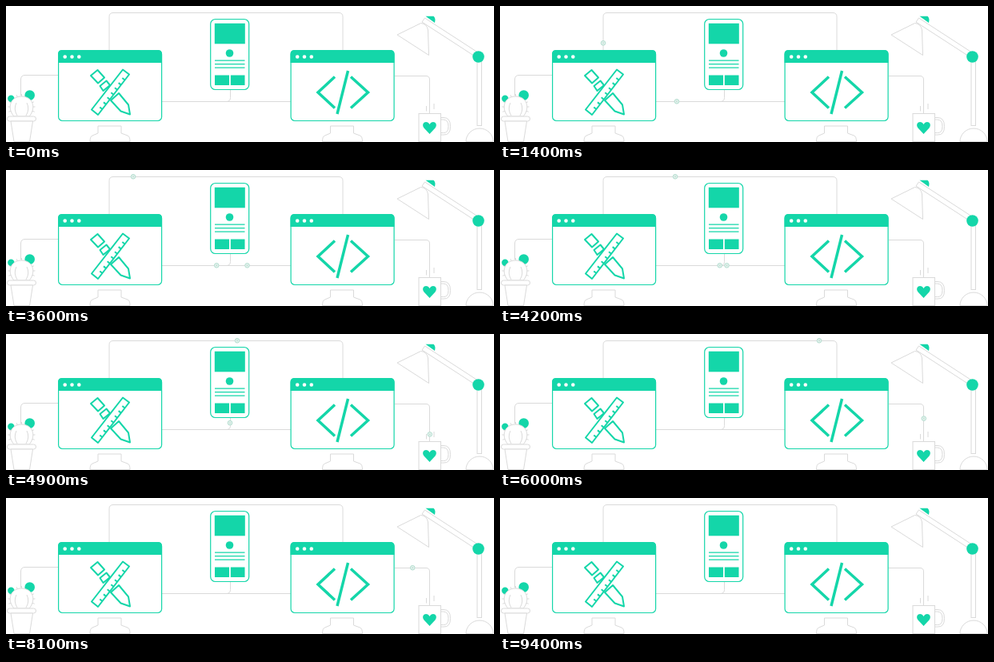
Recreate the animation shown at these times as an HTML page. Size 610 px wide and 170 px high, loop 9.5 s.

```html
<!DOCTYPE html>
<html lang="en">
<head>
<meta charset="utf-8">
<title>Connected workspace</title>
<style>
html, body { margin: 0; width: 100%; height: 100%; overflow: hidden; background: #fff; }
svg { display: block; width: 610px; height: 170px; }
.grey { fill: none; stroke: #dadada; stroke-width: 1; }
.solid { fill: #fff; }
.line { fill: #fff; stroke: #14d6a9; stroke-width: 1.2; }
.green { fill: #14d6a9; }
.tool { fill: #fff; stroke: #14d6a9; stroke-width: 2; stroke-linejoin: round; }
</style>
</head>
<body>
<svg viewBox="0 0 610 170" xmlns="http://www.w3.org/2000/svg">
  <defs>
    <g id="monitor">
      <path class="grey solid" d="M50 150H79V159L87 162Q90 163 90 169.500H40Q40 163 43 162L50 159Z"/>
      <rect class="line" x=".6" y="55.500" width="129" height="88" rx="5"/>
      <path class="green" d="M0 71V60Q0 55 5 55H125Q130 55 130 60V71Z"/>
      <path d="M8.700 63.500h0m8.800 0h0m8.800 0h0" stroke="#fff" stroke-width="4.600" stroke-linecap="round"/>
    </g>
    <g id="dot">
      <circle r="2.800" fill="#e3f4ee" stroke="#b4dccf"/>
      <circle r="1" fill="#c4ddd4"/>
    </g>
  </defs>

  <g class="grey">
    <path d="M129 55V13.500Q129 8.500 134 8.500H416Q421 8.500 421 13.500V55"/>
    <path d="M195 119.500H356M275.500 119.500Q280.500 119.500 280.500 114.500V104"/>
    <path d="M18.500 112V92Q18.500 86.500 24 86.500H65"/>
    <path d="M486 87.500H525Q529.500 87.500 529.500 92V134"/>
    <path d="M525.500 125V131.500M535 122V129"/>
  </g>

  <g id="dots"></g>

  <!-- cactus -->
  <path class="grey" id="spines"/>
  <circle class="green" cx="29.700" cy="111.500" r="6.300"/>
  <circle class="green" cx="6.300" cy="115.800" r="4.200"/>
  <g class="grey">
    <path class="solid" d="M10 138C1 128 5 113 19.500 113S38 128 29 138Z"/>
    <path d="M14 137Q9 129 13 121M25 137Q30 129 26 121"/>
    <rect class="solid" x="1.500" y="138" width="36" height="6" rx="3"/>
    <path class="solid" d="M6 144L10 169.500H29.500L33.500 144Z"/>
  </g>

  <use href="#monitor" x="65"/>
  <use href="#monitor" x="355.500"/>

  <!-- pencil and ruler -->
  <g class="tool">
    <path d="M114.500 80L123 89.500L115 96.500L106 87Z"/>
    <path d="M117.500 100L125.500 93.500L130 99L121.500 106Z"/>
    <path d="M141 109L153 123.500L155 135.500L143.500 131.500L131 118Z"/>
    <path d="M146 79.500L154 85.500L115 136L107 129.500Z"/>
    <path id="ticks"/>
  </g>

  <!-- code sign -->
  <g fill="none" stroke="#14d6a9" stroke-width="3.500">
    <path d="M411 88.500L390 108L411 127.500M431 88.500L452.500 108L431 127.500"/>
    <path d="M427.500 81L414 135"/>
  </g>

  <!-- phone -->
  <rect class="line" x="255.700" y="16.500" width="48" height="88" rx="6"/>
  <g class="green">
    <rect x="260.800" y="21.700" width="38" height="25.600"/>
    <circle cx="279.500" cy="59" r="4.800"/>
    <path d="M261 68.200h37.500m-37.500 4.500h37.500m-37.500 4.500h37.500" stroke="#14d6a9" stroke-width="1.200"/>
    <rect x="261" y="86.500" width="18" height="12.500"/>
    <rect x="280.800" y="86.500" width="17.700" height="12.500"/>
  </g>

  <!-- mug -->
  <g class="grey">
    <path class="solid" d="M543.500 139.500H547Q555.500 139.500 555.500 150.500T547 161H543.500Z"/>
    <path d="M543.500 142H546.500Q553 142 553 150.500T546.500 158.500H543.500"/>
    <rect class="solid" x="516" y="134.500" width="27.500" height="35"/>
  </g>
  <path class="green" d="M529.500 160L522.500 152.500C519.500 148.500 522 145 525 145Q528 145 529.500 148Q531 145 534 145C537 145 539.500 148.500 536.500 152.500Z"/>

  <!-- lamp -->
  <path class="green" d="M524.500 12.700H534.500Q537.500 15.500 536 21Z"/>
  <g class="grey">
    <path class="solid" d="M489 36L518.500 21.500Q526 22 527.500 30L528.500 61.500Z"/>
    <path class="solid" d="M523.500 15L589 57.500L585.500 62.500L520 20Z"/>
    <rect class="solid" x="589" y="66" width="5.500" height="83.500"/>
    <path class="solid" d="M575 169.500A17 16.500 0 0 1 609 169.500Z"/>
  </g>
  <circle class="green" cx="590.500" cy="63.500" r="7.300"/>
</svg>
<script>
const LOOP = 9500, STEP = 100;
const $ = id => document.getElementById(id);
const leg = (dx, dy, speed) => ({ dx, dy, ms: Math.hypot(dx, dy) / speed * 1000 });

// Each dot runs straight legs at a steady speed (px per second) and then vanishes.
const routes = [
  { at: 0, x: 129, y: 74.3, legs: [leg(0, -66, 20), leg(292, 0, 100), leg(0, 42, 25)] },
  { at: 100, x: 196, y: 119.3, legs: [leg(84, 0, 19.2), leg(0, -22, 19.2)] },
  { at: 1600, x: 361.5, y: 119.3, legs: [leg(-81, 0, 30), leg(0, -22, 30)] },
  { at: 4200, x: 529.8, y: 138, legs: [leg(0, -50.8, 18), leg(-48, 0, 20)] }
];

const dots = routes.map(() => {
  const use = document.createElementNS("http://www.w3.org/2000/svg", "use");
  use.setAttribute("href", "#dot");
  return $("dots").appendChild(use);
});

function place({ at, x, y, legs }, t) {
  let left = t - at;
  if (left < 0) return null;
  for (const { dx, dy, ms } of legs) {
    const k = Math.min(left / ms, 1);
    x += dx * k;
    y += dy * k;
    if (k < 1) return [x, y];
    left -= ms;
  }
  return null;
}

function drawDetails() {
  let ticks = "", spines = "";
  for (let k = .14; k < .9; k += .12) {
    ticks += `M${154 - 39 * k} ${85.5 + 50.5 * k}l-3.200 -2.500`;
  }
  for (let i = 0; i < 11; i++) {
    const a = Math.PI * (.9 + i * .12), c = Math.cos(a), s = Math.sin(a);
    spines += `M${19.5 + 13 * c} ${127 + 13 * s}L${19.5 + 17 * c} ${127 + 17 * s}`;
  }
  $("ticks").setAttribute("d", ticks);
  $("spines").setAttribute("d", spines);
}

function render(now) {
  const t = Math.floor(now % LOOP / STEP) * STEP;
  dots.forEach((dot, i) => {
    const p = place(routes[i], t);
    dot.setAttribute("visibility", p ? "visible" : "hidden");
    if (p) dot.setAttribute("transform", `translate(${p})`);
  });
}

function frame() {
  render(performance.now() - start);
  requestAnimationFrame(frame);
}

drawDetails();
const start = performance.now();
frame();
</script>
</body>
</html>
```
